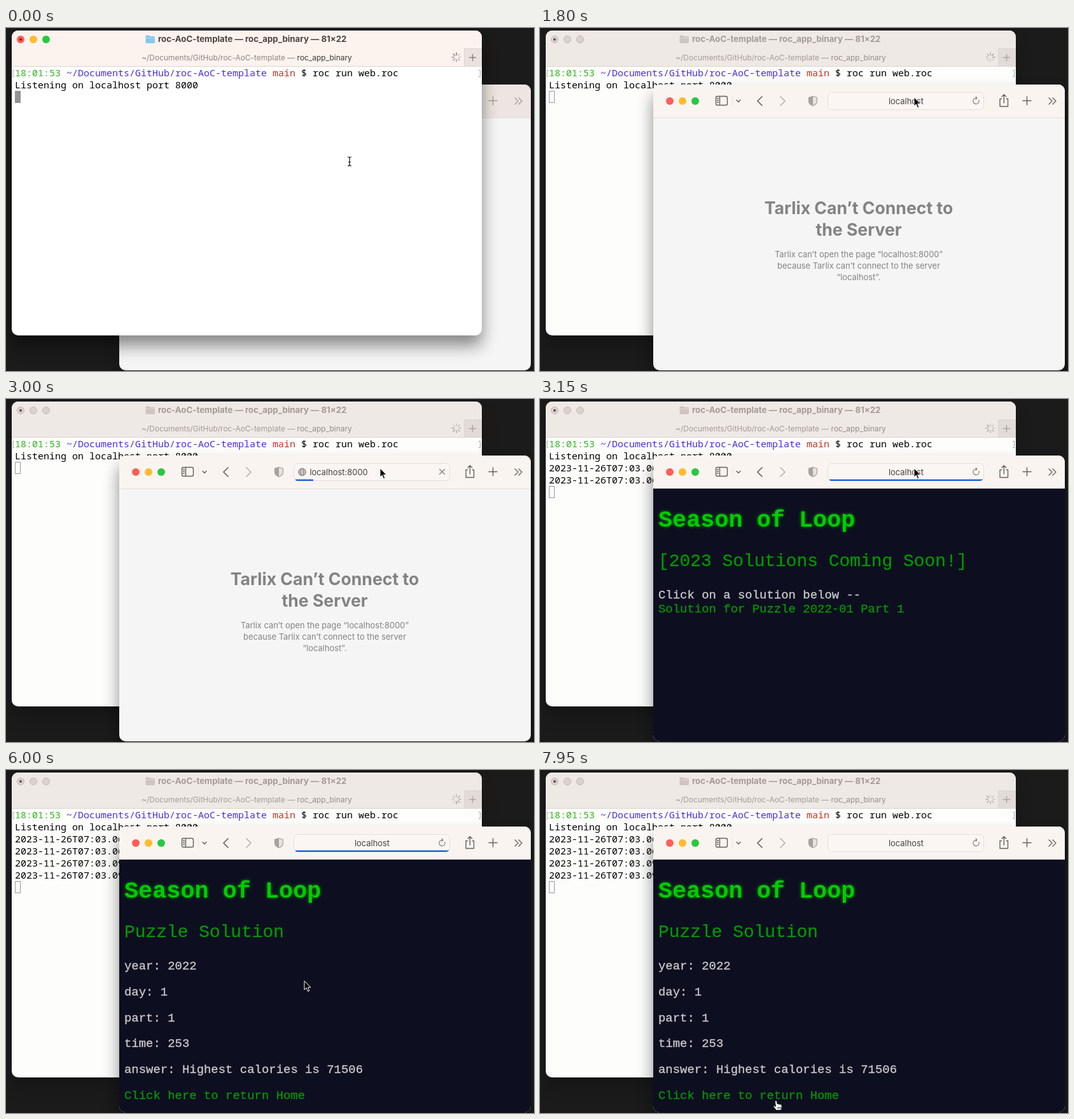
An HTML page that plays this animation: 830 px wide and 540 px high, repeating every 8 s.

```html
<!DOCTYPE html>
<html lang="en">
<head>
<meta charset="utf-8">
<title>Local web server demo</title>
<style>
  html, body { margin: 0; width: 100%; height: 100%; overflow: hidden; background: #1a1a1a; }
  svg { display: block; width: 830px; height: 540px; }
  text { font-family: Inter, "Open Sans", sans-serif; white-space: pre; }
  .mid { text-anchor: middle; }
  .bold { font-weight: 700; }
  .mono text { font: 500 15px "Noto Sans Mono", "DejaVu Sans Mono", monospace; }
  .dark text { font: 18.95px "Liberation Mono", "Courier New", monospace; fill: #ccc; stroke: #ccc; stroke-width: .3; }
  .dark .h1 { font-size: 36.85px; font-weight: 700; fill: #0c0; stroke: none; filter: drop-shadow(0 0 2.5px #00cc00b0); }
  .dark .h2 { font-size: 27.9px; fill: #090; stroke: #090; }
  .dark .link { fill: #090; stroke: #090; }
  .line { fill: none; stroke: var(--icon); stroke-width: 1.4; stroke-linecap: round; stroke-linejoin: round; }
  .thin { stroke: #7d7774; stroke-width: 1.1; }
  #term { --bar: #fcf3ee; --body: #fff; --title: #4b4542; --path: #8d8683; --app: #3d3836; --tab: #ebe2de; --icon: #85807d; --folder: #85c8ec; }
  #term.off { --bar: #efe9e6; --body: #fdfdfb; --title: #a29b98; --path: #a29b98; --app: #948d8a; --tab: #e2dbd8; --icon: #aaa3a0; --folder: #cfc5be; }
  #web { --bar: #faf4f0; --icon: #67615e; }
  #web.off { --bar: #ede5e1; --icon: #a49d9a; }
</style>
</head>
<body>
<svg id="stage" viewBox="0 0 830 540" xmlns="http://www.w3.org/2000/svg">
  <defs>
    <filter id="blur" x="-20%" y="-20%" width="140%" height="140%"><feGaussianBlur stdDeviation="13"/></filter>
    <filter id="soft" x="-20%" y="-20%" width="140%" height="140%"><feGaussianBlur stdDeviation="4"/></filter>
    <clipPath id="termClip"><rect x="9" y="4" width="739" height="480" rx="10"/></clipPath>
    <clipPath id="webClip"><rect x="178" y="89" width="647" height="450" rx="10"/></clipPath>
    <clipPath id="urlClip"><rect x="452.5" y="101.5" width="245" height="27.5" rx="6"/></clipPath>
  </defs>
  <rect width="830" height="540" fill="#1b1b1b"/>
  <g id="windows">
    <g id="web">
      <rect class="shadow" x="178" y="105" width="647" height="450" rx="10" filter="url(#blur)"/>
      <g clip-path="url(#webClip)">
        <rect x="178" y="89" width="647" height="450" fill="#f5f5f5"/>
        <rect x="178" y="89" width="647" height="52" fill="var(--bar)"/>
        <rect x="178" y="141" width="647" height="1" fill="#e6ddd8"/>
        <g id="lights"></g>
        <g class="line">
          <rect x="276.5" y="107.5" width="18" height="14" rx="2.5"/>
          <path d="M282.5 108v13M278.5 111h2M278.5 114h2M278.5 117h2"/>
          <path d="M309 113.500l3 3 3-3"/>
          <path d="M349 108l-7 7 7 7" stroke-width="1.7"/>
          <path d="M378 108l7 7-7 7" stroke="#b8b1ae" stroke-width="1.7"/>
          <path d="M725.500 111.500h-2.500v12h12.500v-12h-2.500M729.300 118v-13M726 108l3.300-3.300 3.300 3.300"/>
          <path d="M759 114.500h13M765.500 108v13"/>
          <path d="M800 110l5 5-5 5M806 110l5 5-5 5"/>
        </g>
        <path d="M302.500 106v17" stroke="#e8e1dd"/>
        <path d="M429 107.500l6.500 2v5.500q0 5-6.500 7.500q-6.500-2.500-6.500-7.500v-5.500z" fill="#e9e3df" stroke="#a8a19e" stroke-width="1.2"/>
        <path d="M429 107.500v15q-6.500-2.500-6.500-7.500v-5.500z" fill="#a8a19e"/>
        <rect id="ring" x="451" y="100" width="248" height="30" rx="7" fill="none" stroke="#80a9f5" stroke-width="4"/>
        <rect id="field" x="452.500" y="101.500" width="245" height="27" rx="6" stroke="#e5ddd9"/>
        <rect id="bar" x="455" y="126.500" height="2.500" fill="#1763dc" clip-path="url(#urlClip)"/>
        <rect id="selection" x="477" y="107" width="92" height="16" fill="#a9cef6"/>
        <g id="globe" fill="none" stroke="#77716e">
          <circle cx="465.500" cy="115" r="5.800"/>
          <ellipse cx="465.500" cy="115" rx="2.600" ry="5.800"/>
          <path d="M459.700 115h11.600M460.700 112h9.600M460.700 118h9.600"/>
        </g>
        <text id="url" y="119.500" font-size="12.900" fill="#464240"></text>
        <path id="reload" class="line thin" d="M690 113.500a4.700 4.700 0 1 1-4.700-3.300h1.500M685 108l2 2.200-2 2.200"/>
        <path id="stop" class="line thin" d="M681.500 110.500l8 8M689.500 110.500l-8 8"/>
        <g id="failed" class="mid" fill="#838383"></g>
        <g id="home" class="dark"></g>
        <g id="solution" class="dark"></g>
      </g>
      <g id="popup">
        <rect x="326" y="136" width="498" height="430" rx="8" opacity=".3" filter="url(#soft)"/>
        <rect x="326.500" y="132.500" width="497" height="430" rx="8" fill="#ebe6e2" stroke="#cfc9c5"/>
        <g id="tiles"></g>
      </g>
    </g>
    <g id="term">
      <rect class="shadow" x="9" y="20" width="739" height="480" rx="10" filter="url(#blur)"/>
      <g clip-path="url(#termClip)">
        <rect x="9" y="4" width="739" height="480" fill="var(--body)"/>
        <rect x="9" y="4" width="739" height="56" fill="var(--bar)"/>
        <rect x="720" y="32" width="28" height="28" fill="var(--tab)"/>
        <path d="M720.500 32v28M720 32.500h28M9 60.500h739" fill="none" stroke="#ddd5d1"/>
        <g id="termLights"></g>
        <path d="M219.500 13q0-1.500 1.500-1.500h4l1.500 1.500h6q1.500 0 1.500 1.500v8q0 1.500-1.500 1.500h-11.500q-1.500 0-1.500-1.500z" fill="var(--folder)"/>
        <path d="M219.500 15.500h14.500" stroke="#fff" stroke-opacity=".35"/>
        <text class="bold" x="239" y="22" font-size="13.250" fill="var(--title)">roc-AoC-template — roc_app_binary — 81×22</text>
        <text class="mid" x="378.500" y="50.500" font-size="11.950" fill="var(--path)">~/Documents/GitHub/roc-AoC-template — <tspan fill="var(--app)">roc_app_binary</tspan></text>
        <g id="spinner" stroke="var(--icon)" stroke-width="1.700" stroke-linecap="round"></g>
        <path class="line" d="M728.500 46.500h10M733.500 41.500v10"/>
        <path d="M13 66.500h-2v10h2M743 66.500h2.500v10h-2.500" fill="none" stroke="#a5a5a5"/>
        <g class="mono">
          <text x="14" y="76"><tspan fill="#2fb51f">18:01:53</tspan> <tspan fill="#4d2fd9">~/Documents/GitHub/roc-AoC-template</tspan> <tspan fill="#c4321f">main</tspan> $ roc run web.roc</text>
          <text x="14" y="95">Listening on localhost port 8000</text>
          <g id="logs"></g>
        </g>
        <rect id="caret"/>
      </g>
    </g>
  </g>
  <g id="pointer" stroke-linejoin="round">
    <g id="ibeam" fill="none" stroke-linecap="round">
      <path d="M-2.500-7q2.500 0 2.500 2v10q0 2-2.500 2M2.500-7q-2.500 0-2.500 2v10q0 2 2.500 2M-1.500 1h3" stroke="#fff" stroke-width="2.600"/>
      <path d="M-2.500-7q2.500 0 2.500 2v10q0 2-2.500 2M2.500-7q-2.500 0-2.500 2v10q0 2 2.500 2M-1.500 1h3" stroke="#111" stroke-width="1.200"/>
    </g>
    <path id="arrow" d="M0 0v14l3.200-3 2.300 5.600 2.300-1-2.300-5.400h4.500z" fill="#000" stroke="#fff"/>
    <g id="hand">
      <path d="M-3.500 0q0-1.500 1.400-1.500t1.500 1.500l.8 4q1.300-.8 2.300.2q1.300-.6 2.200.4q1.700-.6 2.200 1l.2 3.400-1.200 4.600h-7.600l-4.300-5.600q-.4-1.600 1.200-1.600l2.300 1.600z" fill="#fff" stroke="#222"/>
      <path d="M1 8.500v3M3 8.500v3M5 8.500v3" stroke="#222"/>
    </g>
  </g>
</svg>
<script>
const STEP = 150, LOOP = 8000;
const FRONT = 900, POPUP = 2100, ENTER = 2850, HOME = 3150, SOLVED = 6000;
const $ = id => document.getElementById(id);
const set = (id, attrs) => { for (const k in attrs) $(id).setAttribute(k, attrs[k]); };
const show = (id, on) => set(id, { display: on ? "inline" : "none" });
const text = (x, y, s, attrs = "") => `<text x="${x}" y="${y}" ${attrs}>${s}</text>`;
const circle = (x, y, r, fill, attrs = "") => `<circle cx="${x}" cy="${y}" r="${r}" fill="${fill}" ${attrs}/>`;
const box = (x, y, size, r, fill, attrs = "") =>
  `<rect x="${x}" y="${y}" width="${size}" height="${size}" rx="${r}" fill="${fill}" ${attrs}/>`;

const LIGHTS = ["#ff5f57", "#febc2e", "#28c840"];
const lights = (x, y, on) => LIGHTS.map((c, i) =>
  circle(x + 20 * i, y, on ? 6 : 5.5, on ? c : "#d9d2ce", on ? "" : 'stroke="#c0b8b4"')).join("");

// Favourites: label, tile colour, then an optional mark: "o" disc, "s" square, or a letter.
const WHITE = "#faf9f9";
const ROWS = [
  [207, [["Pelmo", WHITE, "o", "#757575", 19], ["iDrusk", WHITE, "o", "#8b8b8b", 17], ["Vohee", "#5f2bd0"],
    ["Besk", "#2f92f5", "B"], ["Gartum", WHITE, "o", "#4285f4", 20], ["Tomeloria", WHITE, "o", "#333", 16]]],
  [318, [["Palgrove", "#0f66ff"], ["Murmelo", "#050505"], ["Jobvexel", WHITE, "s", "#1078b5"],
    ["The|Drizzle…", "#0a3598"], ["Vumt", WHITE, "o", "#f6263f", 26], ["RoamMarsten", "#3de0a2"]]],
  [498, [["", "#2a2829"], ["", "#4585f0", "G"], ["", WHITE, "o", "#8058db", 21],
    ["", "#9496a2", "L"], ["", WHITE, "o", "#4f8df8", 26], ["", "#4585f0", "G"]]]
];

function tile([label, fill, mark, color, r], x, y) {
  const cx = x + 32;
  let s = box(x, y + 1, 64, 9, "#000", 'opacity=".28" filter="url(#soft)"') + box(x, y, 64, 9, fill);
  if (mark === "o") s += circle(cx, y + 32, r, color);
  else if (mark === "s") s += box(x + 6, y + 6, 52, 5, color);
  else if (mark) s += text(cx, y + 47, mark, 'class="mid" font-size="38" font-weight="300" fill="#f4f7fb"');
  label.split("|").forEach((l, i) => s += text(cx, y + 82 + 14 * i, l, 'class="mid" font-size="10.9" fill="#34302e"'));
  return s;
}

function build() {
  const heading = 'class="bold" font-size="20.8" fill="#4c4745"';
  $("tiles").innerHTML = text(343, 186, "Favourites", heading) + text(343, 476.5, "Frequently Visited", heading) +
    ROWS.map(([y, row]) => row.map((item, i) => tile(item, 343 + 80 * i, y)).join("")).join("");

  const big = 'class="bold" font-size="26.6"', small = 'font-size="12.9"';
  $("failed").innerHTML = text(501, 293, "Tarlix Can’t Connect to", big) + text(501, 327, "the Server", big) +
    text(501, 361, "Tarlix can’t open the page “localhost:8000”", small) +
    text(501, 379, "because Tarlix can’t connect to the server", small) + text(501, 397, "“localhost”.", small);

  const top = h2 => '<rect x="178" y="141" width="647" height="398" fill="#0e0e21"/>' +
    text(186, 201, "Season of Loop", 'class="h1"') + text(186, 263, h2, 'class="h2"');
  $("home").innerHTML = top("[2023 Solutions Coming Soon!]") +
    text(186, 314, "Click on a solution below --") +
    text(186, 336, "Solution for Puzzle 2022-01 Part 1", 'class="link"');
  $("solution").innerHTML = top("Puzzle Solution") +
    ["year: 2022", "day: 1", "part: 1", "time: 253", "answer: Highest calories is 71506"]
      .map((s, i) => text(186, 314 + 40.75 * i, s)).join("") +
    text(186, 517.5, "Click here to return Home", 'class="link"');

  $("logs").innerHTML = ["06", "06", "09", "09"]
    .map((s, i) => text(14, 114 + 19 * i, "2023-11-26T07:03." + s)).join("");
  $("spinner").innerHTML = Array.from({ length: 8 }, (_, i) =>
    `<path d="M708 42.3v-3.3" transform="rotate(${45 * i} 708 46)"/>`).join("");
}

// Pointer path: time, x, y
const PATH = [
  [0, 540, 210], [300, 540, 210], [750, 620, 503], [900, 620, 503], [1650, 588, 109], [3450, 588, 109],
  [4200, 484, 296], [4350, 471, 331], [4650, 473, 337], [5250, 469, 332], [6450, 469, 332],
  [7350, 407, 364], [7800, 371, 525], [7950, 373, 522], [8000, 373, 522]
];

function pointerAt(t) {
  const i = PATH.findIndex(p => p[0] > t);
  const [t0, x0, y0] = PATH[i - 1], [t1, x1, y1] = PATH[i];
  const u = (t - t0) / (t1 - t0), k = u * u * (3 - 2 * u);
  return [x0 + (x1 - x0) * k, y0 + (y1 - y0) * k];
}

// Width and opacity of the page loading bar
function loading(t) {
  if (t >= ENTER && t < HOME) return [10 + (t - ENTER) * 0.12, 1];
  for (const done of [HOME, SOLVED])
    if (t >= done && t < done + 450) return [241, Math.min(1, (done + 450 - t) / 300)];
  return [0, 0];
}

let wasWeb = null;
function drawWindows(web) {
  if (web === wasWeb) return;
  wasWeb = web;
  $("windows").append($(web ? "web" : "term"));
  $("term").classList.toggle("off", web);
  $("web").classList.toggle("off", !web);
  document.querySelectorAll(".shadow").forEach(s =>
    s.setAttribute("opacity", (s.parentNode.id === "web") === web ? 0.45 : 0.2));
  $("lights").innerHTML = lights(204, 115, web);
  $("termLights").innerHTML = lights(23, 18, !web) + circle(23, 18, 2, web ? "#555" : "#861610");
}

function drawTerminal(t, web) {
  const lines = t >= SOLVED ? 4 : t >= HOME ? 2 : 0;
  [...$("logs").children].forEach((l, i) => l.setAttribute("display", i < lines ? "inline" : "none"));
  const y = 99 + 19 * lines, d = web ? 0.5 : 0;
  set("caret", { x: 14 + d, y: y + d, width: 9 - 2 * d, height: 19 - 2 * d,
    fill: web ? "none" : "#929292", stroke: web ? "#999" : "none" });
  const phase = Math.floor(t / 100);
  [...$("spinner").children].forEach((s, i) =>
    s.setAttribute("opacity", 1 - 0.09 * ((phase - i + 800) % 8)));
}

function drawBrowser(t) {
  const popup = t >= POPUP && t < ENTER, enter = t >= ENTER && t < HOME, full = popup || enter;
  show("popup", popup);
  show("ring", popup);
  show("selection", popup);
  show("globe", full);
  show("stop", enter);
  show("reload", !enter);
  show("failed", t < HOME);
  show("home", t >= HOME && t < SOLVED);
  show("solution", t >= SOLVED);
  set("field", { fill: popup ? "#fff" : "#fbf6f3" });
  $("url").textContent = full ? "localhost:8000" : "localhost";
  set("url", { x: full ? 477.5 : 575.5, "text-anchor": full ? "start" : "middle" });
  const [width, opacity] = loading(t);
  set("bar", { width, opacity });
}

function drawPointer(t, web) {
  const [x, y] = pointerAt(t);
  const ibeam = !web && y < 484;
  const hand = t >= HOME && t < SOLVED ? y > 320 && y < 342 : t >= SOLVED && y > 500;
  show("ibeam", ibeam);
  show("hand", hand);
  show("arrow", !ibeam && !hand);
  set("pointer", { transform: `translate(${x.toFixed(1)} ${y.toFixed(1)})` });
}

function draw(now) {
  const t = Math.floor(now % LOOP / STEP) * STEP;
  const web = t >= FRONT;
  drawWindows(web);
  drawTerminal(t, web);
  drawBrowser(t);
  drawPointer(t, web);
}

build();
const start = performance.now();
function tick() {
  draw(performance.now() - start);
  requestAnimationFrame(tick);
}
tick();
</script>
</body>
</html>
```
